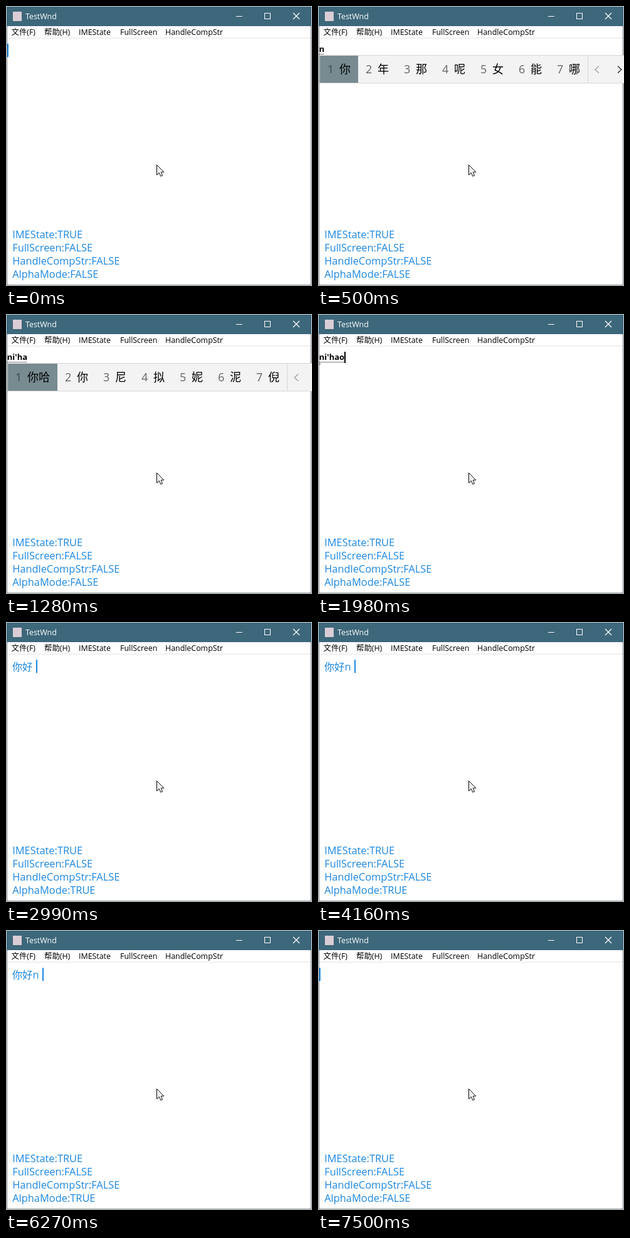
An HTML page with a canvas that plays this animation: 488x445 px, repeating every 8000 ms.

```html
<!DOCTYPE html>
<html lang="zh-CN">
<head>
<meta charset="utf-8">
<style>
html, body { margin: 0; width: 488px; height: 445px; overflow: hidden; }
canvas { display: block; }
</style>
</head>
<body>
<canvas id="stage" width="488" height="445"></canvas>
<script>
const ctx = document.getElementById('stage').getContext('2d');
const LOOP = 8000, BLUE = '#1c87e0';
const FONT = '"Open Sans", "Noto Sans CJK SC", "Noto Sans CJK", sans-serif';

// Typed text: start time, text, caret x
const typed = [
  [0, '', 2], [2060, '你好', 48], [4160, '你好n', 58], [4400, '你好ni', 62],
  [5330, '你好nih', 72], [5410, '你好niha', 82], [5560, '你好nihao', 92],
  [5870, '你好niha', 82], [5950, '你好nih', 72], [6110, '你好ni', 62],
  [6270, '你好n', 58], [6420, '你好', 48], [6650, '你', 31], [6880, '', 2]
];

// Composition: start time, letters, caret x (0 = hidden), candidates
const ni = '你 尼 拟 妮 泥 倪 逆', hao = '你好 拟好 你 尼 拟 妮 泥';
const composing = [
  [0], [500, 'n', 0, '你 年 那 呢 女 能 哪'], [890, 'ni', 0, ni], [1050, 'ni', 14, ni],
  [1130, "ni'h", 26, '你好 你会 你 尼 拟 妮 泥'],
  [1280, "ni'ha", 0, '你哈 你 尼 拟 妮 泥 倪'],
  [1370, "ni'hao", 0, hao], [1510, "ni'hao", 42, hao], [1980, "ni'hao", 42], [2060]
];

const at = (steps, t) => steps.findLast(s => s[0] <= t);

function rect(x, y, w, h, color) {
  ctx.fillStyle = color;
  ctx.fillRect(x, y, w, h);
}

function text(s, x, y, size, color, weight = 400) {
  ctx.font = `${weight} ${size}px ${FONT}`;
  ctx.fillStyle = color;
  ctx.fillText(s, x, y);
}

function line(points, color, width = 1) {
  ctx.beginPath();
  points.forEach(([x, y]) => ctx.lineTo(x, y));
  ctx.strokeStyle = color;
  ctx.lineWidth = width;
  ctx.stroke();
}

function drawWindow() {
  rect(0, 0, 488, 445, '#d3d6d8');
  rect(1, 1, 486, 443, '#6b7378');
  rect(2, 32, 484, 411, '#fff');
  rect(1, 1, 486, 31, '#3d677a');
  rect(2, 50, 484, 2, '#f0f0f0');
  rect(11, 9, 14, 15, '#d9cdd6');
  text('TestWnd', 31, 21, 12.4, '#fff');
  line([[367, 16.5], [377, 16.5]], '#fff');
  ctx.strokeRect(412.5, 11.5, 9, 9);
  line([[458, 11], [468, 21]], '#fff', 1.3);
  line([[468, 11], [458, 21]], '#fff', 1.3);
  [['文件(F)', 8.5], ['帮助(H)', 61], ['IMEState', 116], ['FullScreen', 182], ['HandleCompStr', 254]]
    .forEach(([s, x]) => text(s, x, 46, 12.4, '#000'));
}

function drawCandidates(list) {
  rect(2, 78, 486, 45, '#d6d6d6');
  rect(3, 79, 485, 43, '#f3f3f3');
  let x = 3;
  list.split(' ').forEach((word, i) => {
    const w = 43 + 18 * word.length;
    if (!i) rect(x, 79, w, 43, '#778b91');
    text(i + 1, x + 12, 107, 18, i ? '#666' : '#3f4b50');
    text(word, x + 31, 107, 18, '#000');
    x += w;
  });
  rect(x, 79, 1, 43, '#d6d6d6');
  line([[x + 18, 95.5], [x + 12, 101], [x + 18, 106.5]], '#999', 1.2);
  line([[x + 48, 95.5], [x + 54, 101], [x + 48, 106.5]], '#222', 1.2);
}

function drawComposition(letters, caret, list) {
  text(letters, 1.7, 73, 13, '#000', 700);
  const end = 1 + ctx.measureText(letters).width;
  for (let x = 2; x < end; x += 2) rect(x, 76, 1, 1, '#000');
  if (caret) rect(caret, 60, 2, 18, '#000');
  if (list) drawCandidates(list);
  else rect(2, 78, 2, 3, '#999');
}

function drawPointer() {
  ctx.beginPath();
  [[240.5, 252.5], [240.5, 268.5], [244.3, 265], [246.8, 270.5], [249.5, 269.5], [247.2, 264], [251.8, 264]]
    .forEach(([x, y]) => ctx.lineTo(x, y));
  ctx.closePath();
  ctx.fillStyle = '#fff';
  ctx.fill();
  ctx.strokeStyle = '#000';
  ctx.lineWidth = 1;
  ctx.stroke();
}

function draw(now) {
  const t = now % LOOP;
  const alpha = t >= 2990 && t < 7500 ? 'TRUE' : 'FALSE';
  drawWindow();
  ['IMEState:TRUE', 'FullScreen:FALSE', 'HandleCompStr:FALSE', 'AlphaMode:' + alpha]
    .forEach((s, i) => text(s, 10.2, 369 + 21 * i, 16.4, BLUE));
  const [, letters, caret, list] = at(composing, t);
  if (letters) {
    drawComposition(letters, caret, list);
  } else {
    const [, s, x] = at(typed, t);
    text(s, 9.7, 77, 16.4, BLUE);
    rect(x, 60, 2, 21, BLUE);
  }
  drawPointer();
}

const start = performance.now();
function tick() {
  draw(performance.now() - start);
  requestAnimationFrame(tick);
}
tick();
</script>
</body>
</html>
```
